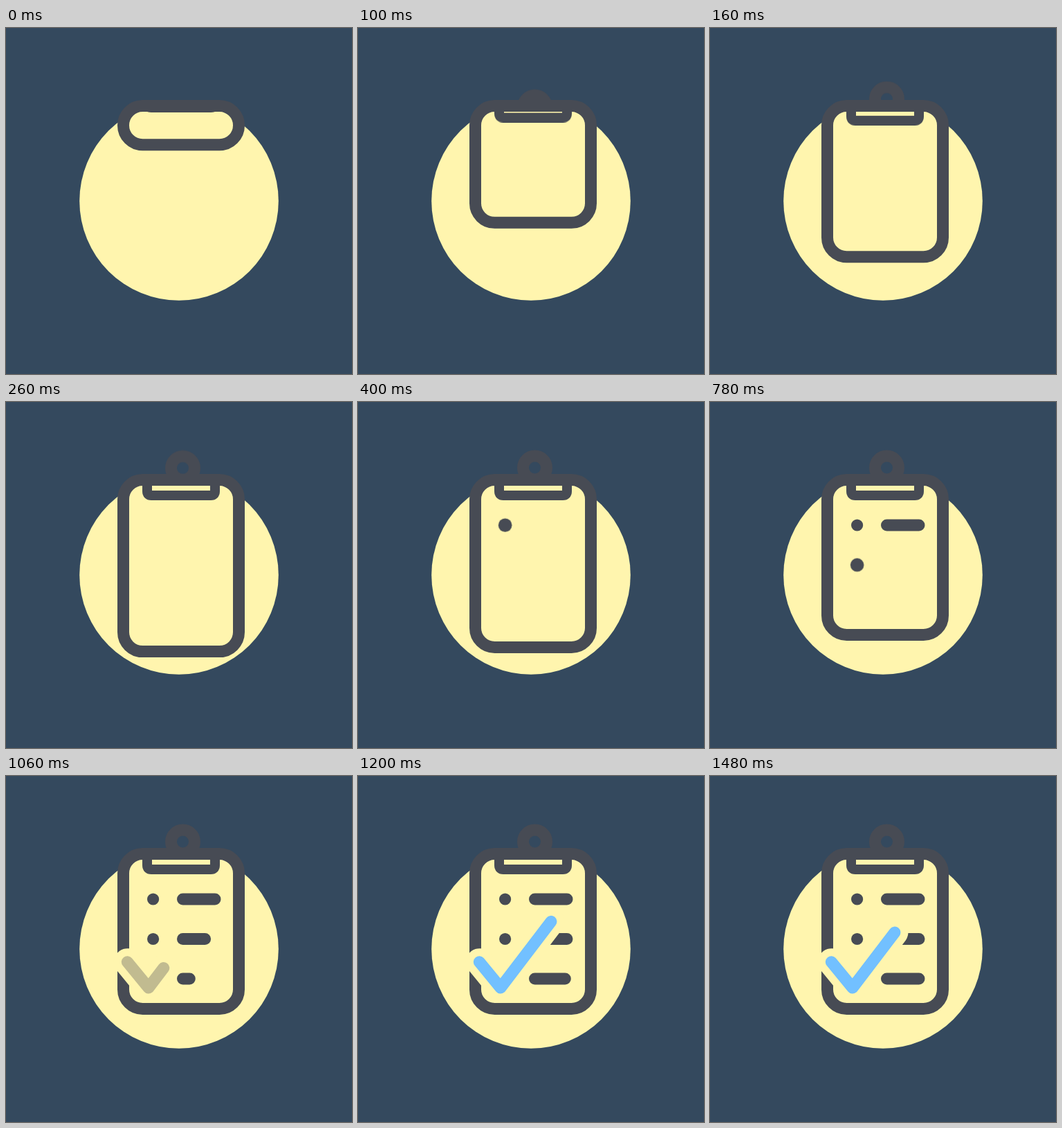
Write an HTML page that moves like this. It is 500x500 px and loops after 2220 ms.

```html
<!DOCTYPE html>
<html lang="en">
<head>
<meta charset="utf-8">
<title>Checklist</title>
<style>
  html, body { margin: 0; width: 100%; height: 100%; overflow: hidden; background: #34495e; }
  svg { display: block; width: 100%; height: 100%; }

  :root {
    --ink: #474b54;
    --paper: #fff5ae;
    --blue: #72c0ff;
    --out: cubic-bezier(.39, .575, .565, 1);
    --in-out: cubic-bezier(.37, 0, .63, 1);
  }

  .line { fill: none; stroke: var(--ink); stroke-width: 17; stroke-linecap: round; stroke-linejoin: round; }
  .clip { stroke-width: 14; }
  .halo { stroke: var(--paper); stroke-width: 39; }
  .dot { fill: var(--ink); transform-box: fill-box; transform-origin: center; }
  .draw { stroke-dasharray: 1 2; }

  .board, .ring, .clip, .dot, .draw { animation: 2220ms linear infinite; }
  .board { animation-name: board; }
  .ring { animation-name: ring; }
  .clip { animation-name: clip; }
  .dot1 { animation-name: dot1; }
  .dot2 { animation-name: dot2; }
  .bar1 { animation-name: bar1; }
  .bar2 { animation-name: bar2; }
  .bar3 { animation-name: bar3; }
  .halo { animation-name: check; }
  .tick { animation-name: check, tint; }

  @keyframes board {
    0% { height: 56px; animation-timing-function: var(--out); }
    13.514% { height: 250px; animation-timing-function: cubic-bezier(.55, 0, .5, 1); }
    24.324%, 100% { height: 224px; }
  }
  @keyframes ring {
    0% { transform: translateY(46px); animation-timing-function: var(--out); }
    13.514%, 100% { transform: none; }
  }
  @keyframes clip {
    0% { transform: translateY(-20.5px); animation-timing-function: var(--out); }
    10.36%, 100% { transform: none; }
  }

  @keyframes dot1 {
    0%, 13.514% { transform: scale(0); animation-timing-function: var(--out); }
    18.018% { transform: scale(1.14); animation-timing-function: var(--in-out); }
    22.523%, 100% { transform: scale(1); }
  }
  @keyframes dot2 {
    0%, 30.631% { transform: scale(0); animation-timing-function: var(--out); }
    35.135% { transform: scale(1.14); animation-timing-function: var(--in-out); }
    39.64%, 100% { transform: scale(1); }
  }

  @keyframes bar1 {
    0%, 23.42% { opacity: 0; stroke-dashoffset: 1; }
    23.423% { opacity: 1; stroke-dashoffset: 1; animation-timing-function: var(--in-out); }
    35.135%, 100% { opacity: 1; stroke-dashoffset: 0; }
  }
  @keyframes bar2 {
    0%, 43.06% { opacity: 0; stroke-dashoffset: 1; }
    43.063% { opacity: 1; stroke-dashoffset: 1; animation-timing-function: var(--in-out); }
    54.73%, 100% { opacity: 1; stroke-dashoffset: 0; }
  }
  @keyframes bar3 {
    0%, 45.9% { opacity: 0; stroke-dashoffset: 1; }
    45.903% { opacity: 1; stroke-dashoffset: 1; animation-timing-function: var(--in-out); }
    57.57%, 100% { opacity: 1; stroke-dashoffset: 0; }
  }

  /* The stroke runs past its resting length, then settles back. */
  @keyframes check {
    0%, 43.24% { opacity: 0; stroke-dashoffset: 1; }
    43.243% { opacity: 1; stroke-dashoffset: 1; animation-timing-function: var(--in-out); }
    59.91% { opacity: 1; stroke-dashoffset: 0; animation-timing-function: var(--in-out); }
    66.667%, 100% { opacity: 1; stroke-dashoffset: .191; }
  }
  @keyframes tint {
    0%, 45.946% { stroke: var(--ink); stroke-opacity: 0; }
    47.748% { stroke: var(--ink); stroke-opacity: .33; }
    52.252%, 100% { stroke: var(--blue); stroke-opacity: 1; }
  }
</style>
</head>
<body>
<svg viewBox="0 0 500 500">
  <defs>
    <clipPath id="above"><rect width="500" height="112"/></clipPath>
    <clipPath id="below"><rect y="112" width="500" height="388"/></clipPath>
  </defs>

  <circle cx="250" cy="250" r="143.8" fill="#fff5ae"/>

  <g clip-path="url(#above)"><circle class="line ring" cx="255.5" cy="95" r="17"/></g>
  <g clip-path="url(#below)"><path class="line clip" d="M204 90V129q0 6 6 6H296q6 0 6-6V90"/></g>
  <rect class="line board" x="169.5" y="112.5" width="167" height="224" rx="28"/>

  <circle class="dot dot1" cx="212.6" cy="178" r="8.6"/>
  <circle class="dot dot2" cx="212.6" cy="235.5" r="8.6"/>
  <path class="line draw bar1" pathLength="1" d="M255.5 178h46.5"/>
  <path class="line draw bar2" pathLength="1" d="M255.5 235.5h46.5"/>
  <path class="line draw bar3" pathLength="1" d="M255.5 293h46.5"/>

  <path class="line draw halo" pathLength="1" d="M175.3 268.7L206 306L288.2 198.2"/>
  <path class="line draw tick" pathLength="1" d="M175.3 268.7L206 306L288.2 198.2"/>
</svg>
</body>
</html>
```
